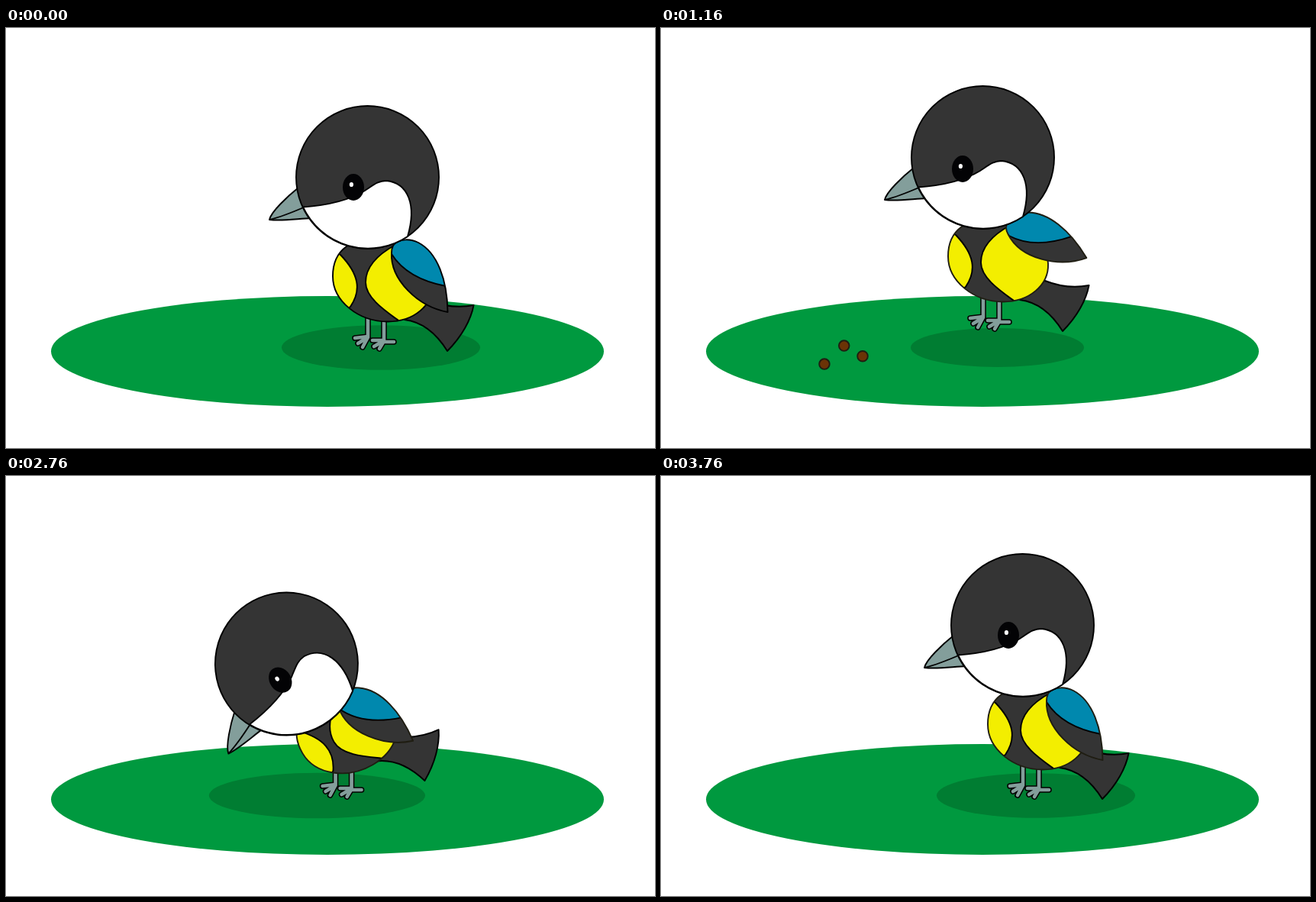
An HTML page with a canvas that plays this animation: 850 px wide and 550 px high, repeating every 4040 ms.

```html
<!DOCTYPE html>
<html lang="en">
<head>
<meta charset="utf-8">
<title>Hopping tit</title>
<style>
html, body { margin: 0; width: 100%; height: 100%; overflow: hidden; background: #fff; }
canvas { display: block; }
</style>
</head>
<body>
<canvas id="stage" width="850" height="550"></canvas>
<script>
const ctx = document.getElementById('stage').getContext('2d');
const LOOP = 4040, STEP = 40;
const DARK = '#343434', YELLOW = '#f3ee00', BLUE = '#0088ae', GREY = '#839e9b';

// Each key: time, x, y, bend, wing angle, eye shift, shadow shift, shadow width
const REST = [0, 0, 0, 0, 0, 0, 260];
const PEAK = [-52, -26, 0, -30, 8, 1.5, 227];
const keys = [
  [0, ...REST], [25, ...REST],
  [118, ...PEAK],
  [210, -97.3, 0, 0, 0, 4, 0, 260],
  [920, ...REST], [1068, ...REST],
  [1160, ...PEAK],
  [1252, -100, 0, 0, 0, 6, 0, 260],
  [1405, -83, 0, 1.1, 0, 6, -23, 291],
  [1622, -74, 0, 0.5, 0, 6, -14.5, 289],
  [1840, -66, 0, 1.1, 0, 6, -23, 291],
  [2057, -66, 0, 0.5, 0, 6, -14.5, 289],
  [2275, -66, 0, 1.1, 0, 5, -23, 291],
  [2492, -66, 0, 0.5, 0, 3, -14.5, 289],
  [2710, -66, 0, 1.1, 0, 0, -64, 296],
  [2850, ...REST], [2865, ...REST],
  [2958, ...PEAK],
  [3050, -97.2, 0, 0, 0, 4, 0, 260],
  [3760, ...REST], [LOOP, ...REST]
];

const ROLL_END = 1360;
const seeds = [
  { x: 260, y: 441.3, speed: 9.2, from: 600, eaten: 1405 },
  { x: 277.5, y: 417.3, speed: 7.55, from: 360, eaten: 1840 },
  { x: 305.7, y: 431, speed: 8.33, from: 320, eaten: 2275 }
];

const shapes = {
  tail: 'M522 382C546 385 565 402 578 423C597 404 609 382 612.5 363C592 367 575 365 555 357L520 360Z',
  body: 'M446 286C432 296 428 311 428 325C428 358 462 384.5 500 384.5C535 384.5 560 362 559 335C558 300 520 270 490 270C470 270 455 277 446 286Z',
  breastLeft: 'M438 297C462 322 466 343 451 365L400 400L400 280Z',
  breastRight: 'M510 284C488 296 471 312 471 333C471 353 496 370 514 383L580 420L580 290Z',
  wing: 'M507 285C515 275 530 276 540 281C565 294 578 330 578.5 372C540 365 503 330 505 294C505 290 506 287 507 285Z',
  wingTop: 'M505 296C520 320 545 332 576 338L600 260L500 260Z',
  beak: 'M383 209C368 221 347 241 345 251C361 253 380 250 400 249L410 220Z',
  beakLine: 'M345 251C362 247 376 241 392 234',
  cheek: 'M389 234.5C425 232 452 224 470 213C482 205 488 200 498 200C527 203 538 232 526 273A94 94 0 0 1 389 234.5Z',
  legs: 'M474 375V404M474 404L457 406M474 405L461 413M474 405L467 418M495 375V410M495 411H508M494 409L480 409M494 410L482 417M495 410L489 420'
};
for (const name in shapes) shapes[name] = new Path2D(shapes[name]);

function poseAt(t) {
  const i = Math.max(1, keys.findIndex(k => k[0] > t));
  const a = keys[i - 1], b = keys[i];
  const u = (t - a[0]) / (b[0] - a[0]);
  return a.slice(1).map((v, n) => v + (b[n + 1] - v) * u);
}

function ellipse(x, y, rx, ry, fill, line) {
  ctx.beginPath();
  ctx.ellipse(x, y, rx, ry, 0, 0, 2 * Math.PI);
  ctx.fillStyle = fill;
  ctx.fill();
  if (line) { ctx.strokeStyle = line; ctx.stroke(); }
}

function paint(path, fill) {
  ctx.fillStyle = fill;
  ctx.fill(path);
  ctx.strokeStyle = '#000';
  ctx.stroke(path);
}

// Draws markings inside an outline and then the outline on top
function patched(outline, base, marks, color) {
  ctx.save();
  ctx.clip(outline);
  ctx.fillStyle = base;
  ctx.fill(outline);
  marks.forEach(m => paint(m, color));
  ctx.restore();
  ctx.stroke(outline);
}

function part(pivotX, pivotY, angle, dx, dy, draw) {
  ctx.save();
  ctx.translate(pivotX + dx, pivotY + dy);
  ctx.rotate(angle * Math.PI / 180);
  ctx.translate(-pivotX, -pivotY);
  draw();
  ctx.restore();
}

function drawSeeds(t) {
  for (const s of seeds) {
    if (t < s.from || t >= s.eaten) continue;
    const left = Math.max(0, ROLL_END - t) / STEP;
    ellipse(s.x - s.speed * left, s.y - 0.25 * left, 6.8, 6.8, '#6b3306', '#1f1d12');
  }
}

function drawLegs() {
  ctx.save();
  ctx.lineCap = ctx.lineJoin = 'round';
  for (const [width, color] of [[7.6, '#000'], [4.6, GREY]]) {
    ctx.lineWidth = width;
    ctx.strokeStyle = color;
    ctx.stroke(shapes.legs);
  }
  ctx.restore();
}

function drawHead(eye) {
  paint(shapes.beak, GREY);
  ctx.stroke(shapes.beakLine);
  ellipse(473.5, 195.5, 93.5, 93.5, DARK, '#000');
  paint(shapes.cheek, '#fff');
  const x = 455 - eye, y = 208.5 + eye * 0.25;
  ellipse(x, y, 14, 17.5, '#030305');
  ellipse(x - 2.6, y - 3.5, 2.6, 3.1, '#fff');
}

function draw(t) {
  const [x, y, bend, wing, eye, shadowX, shadowW] = poseAt(t);
  ctx.fillStyle = '#fff';
  ctx.fillRect(0, 0, 850, 550);
  ctx.lineWidth = 1.9;
  ctx.lineJoin = 'round';
  ellipse(421, 423.5, 362, 72.5, '#00993f');
  ellipse(491 + x + shadowX, 418.5, shadowW / 2, 29.3 + (shadowW - 260) * (shadowW < 260 ? 0.115 : 0.02), '#007d32');
  drawSeeds(t);

  ctx.save();
  ctx.translate(x, y);
  part(491, 361, -20.7 * bend, 0, 0, () => paint(shapes.tail, DARK));
  drawLegs();
  part(491, 324, -43 * bend, -9 * bend, 9 * bend, () =>
    patched(shapes.body, DARK, [shapes.breastLeft, shapes.breastRight], YELLOW));
  part(510, 292, wing - 31.8 * bend, -40 * bend, 10 * bend, () =>
    patched(shapes.wing, DARK, [shapes.wingTop], BLUE));
  part(473.5, 195.5, -47.7 * bend, -90 * bend, 71.5 * bend, () => drawHead(eye));
  ctx.restore();
}

let start;
function tick(now) {
  start ??= now;
  const t = (now - start) % LOOP;
  draw(Math.floor(t / STEP) * STEP);
  requestAnimationFrame(tick);
}
draw(0);
requestAnimationFrame(tick);
</script>
</body>
</html>
```
